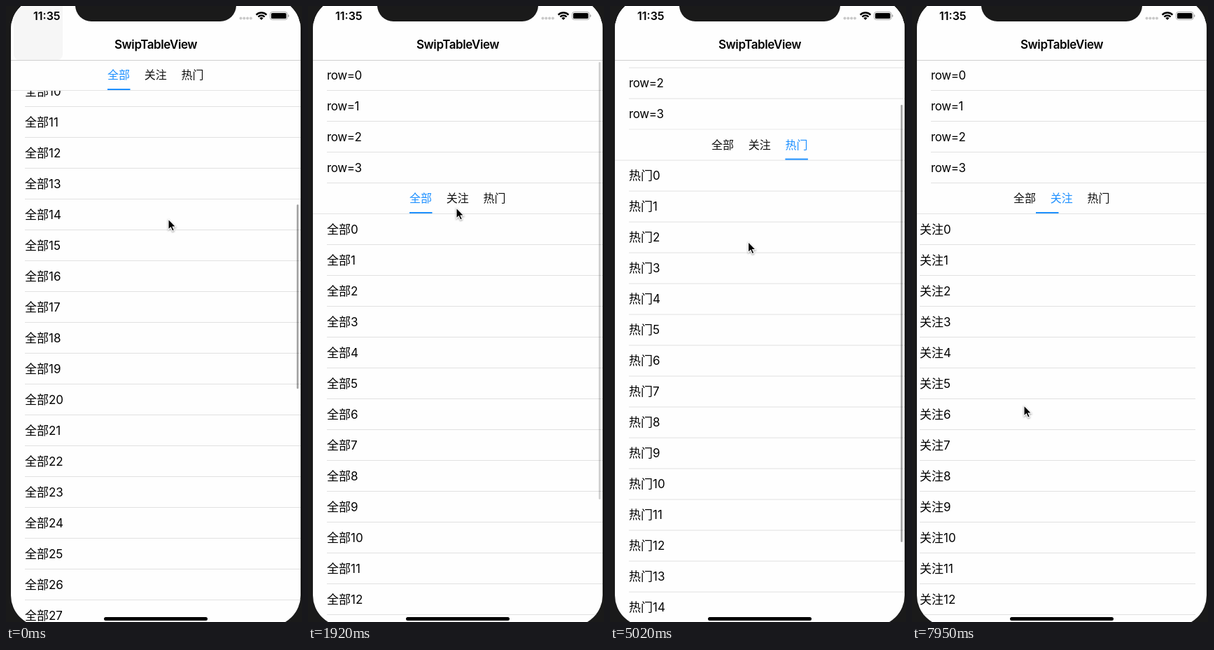
Recreate the animation shown at these times as an HTML page. Size 423x879 px, loop 8 s.

```html
<!DOCTYPE html>
<html lang="zh">
<head>
<meta charset="utf-8">
<title>SwipTableView</title>
<style>
  html, body { margin: 0; width: 100%; height: 100%; overflow: hidden; background: #1a1a1a; }
  svg { display: block; width: 423px; height: 879px; }
  text { font-family: Inter, "Noto Sans CJK SC", "Noto Sans CJK", sans-serif; fill: #000; }
  .row { font-size: 17px; }
  #head .row { letter-spacing: -.43px; }
  .tab { font-size: 16px; font-weight: 500; }
  .bold { font-weight: 600; }
</style>
</head>
<body>
<svg id="stage" viewBox="0 0 423 879">
  <defs>
    <clipPath id="screen"><rect x="7" y="-11" width="414" height="896" rx="44"/></clipPath>
  </defs>
  <rect width="423" height="879" fill="#1a1a1a"/>
  <g clip-path="url(#screen)">
    <rect x="7" y="-11" width="414" height="896" fill="#fefefe"/>
    <g id="lists"></g>
    <g id="head"></g>
    <g id="tabs">
      <rect x="7" width="414" height="44" fill="#fefefe"/>
      <rect x="7" y="43" width="414" height="1" fill="#e4e4e4"/>
      <rect id="line" y="41" width="32.5" height="2" fill="#1e90ff"/>
    </g>
    <rect id="bar" x="415.5" width="2.5" rx="1.25"/>
    <rect x="7" y="-11" width="414" height="88" fill="#fefefe"/>
    <rect id="shade" x="11" y="-10" width="70" height="87" rx="8" fill="#f6f6f6"/>
    <rect x="7" y="77" width="414" height="1" fill="#cfcfcf"/>
    <text class="bold" x="39" y="20" font-size="16">11:35</text>
    <text class="bold" x="214" y="61" font-size="17" letter-spacing="-.43" text-anchor="middle">SwipTableView</text>
    <g id="dots" fill="#c9c9c9"></g>
    <g fill="none" stroke="#000" stroke-width="2.4">
      <path d="M357.6 12.6a10.4 10.4 0 0 1 14.8 0"/>
      <path d="M360.4 15.5a6.4 6.4 0 0 1 9.2 0"/>
    </g>
    <path d="M362.4 17.2a3.8 3.8 0 0 1 5.2 0L365 19.9z"/>
    <rect x="377.5" y="8.5" width="24.5" height="11" rx="3" fill="none" stroke="#a6a6a6"/>
    <rect x="379" y="10" width="21.5" height="8" rx="1.6"/>
    <path d="M403 12v4q1.6-.6 1.6-2t-1.6-2z" fill="#a6a6a6"/>
    <rect x="99" y="-40" width="230" height="62" rx="23" fill="#1a1a1a"/>
    <rect x="140" y="872" width="148" height="5" rx="2.5"/>
  </g>
  <path id="mouse" d="M0 0V15.2L3.4 12L5.8 17.2L8.4 16.1L6.1 11.1H10.8Z" stroke="#fff" stroke-width="1.1"
    style="filter:drop-shadow(0 1px 1px #0006)"/>
</svg>
<script>
const $ = id => document.getElementById(id);
const names = ['全部', '关注', '热门'];
const LOOP = 8000, STEP = 147.2, ROW = 44, WIDTH = 414, NAV = 77, HEAD = 4 * ROW;
const tabX = i => 145 + 52.7 * i;

function add(parent, tag, attrs, text) {
  const el = document.createElementNS('http://www.w3.org/2000/svg', tag);
  for (const k in attrs) el.setAttribute(k, attrs[k]);
  if (text) el.textContent = text;
  return parent.appendChild(el);
}

function addRows(parent, count, label) {
  for (let i = 0; i < count; i++) {
    add(parent, 'text', { class: 'row', x: 27, y: ROW * i + 27.5 }, label + i);
    add(parent, 'rect', { x: 27, y: ROW * i + 43, width: 394, height: 1, fill: '#e1e1e1' });
  }
}

const pages = names.map(name => {
  const g = add($('lists'), 'g', {});
  addRows(g, 50, name);
  return g;
});
add($('head'), 'rect', { x: 7, width: WIDTH, height: HEAD, fill: '#fefefe' });
addRows($('head'), 4, 'row=');
const tabs = names.map((name, i) => add($('tabs'), 'text', { class: 'tab', x: tabX(i), y: 27 }, name));
for (let i = 0; i < 4; i++) add($('dots'), 'circle', { cx: 335.5 + 4.8 * i, cy: 17.5, r: 2 });

const ramp = (n, a, b) => Math.min(1, Math.max(0, (n - a) / (b - a)));
const smooth = u => u * u * (3 - 2 * u);

// Each move is [first step, last step, destination]
const glide = (n, from, moves) =>
  moves.reduce((v, [a, b, to]) => v + (to - v) * smooth(ramp(n, a, b)), from);

const flings = [[0, 8.47, 0], [18, 26, 832], [26, 35.84, 0]];
const swipes = [[14, 17, 2], [41, 45, 1], [46, 50, 0], [51, 54, 1.0386]];
const drags = [
  [0, 5, [191, 497]], [8, 13, [212, 288]], [13, 15, [264, 276]], [17, 20, [238, 600]],
  [20, 24, [245, 239]], [25, 29, [210, 566]], [30, 33, [200, 320]], [33, 40, [155, 618]],
  [41, 44, [408, 560]], [44, 46, [170, 575]], [46, 48, [400, 560]], [51, 54, [160, 570]]
];
const axis = i => drags.map(([a, b, to]) => [a, b, to[i]]);
const dragX = axis(0), dragY = axis(1);

function scrollAt(n) {
  const v = Math.max(0, n - 35.84);
  return glide(n, 637, flings) - 42 * v * Math.exp(-v); // rubber band at the top
}
const pageAt = n => glide(n, 0, swipes);
const barAlpha = n => .37 * (1 - ramp(n, 11, 15) + ramp(n, 19, 20) - ramp(n, 41, 44));

const move = (el, x, y) => el.setAttribute('transform', `translate(${x} ${y})`);

function draw(ms) {
  const n = Math.floor(ms / STEP);
  const s = scrollAt(n), p = pageAt(n);
  const pinned = s >= HEAD;

  pages.forEach((g, i) => move(g, (i - p) * WIDTH, NAV + HEAD + ROW - s));
  move($('head'), 0, NAV - s);
  move($('tabs'), 0, NAV + Math.max(0, HEAD - s));
  tabs.forEach((t, i) => t.style.fill = i === Math.round(p) ? '#1e90ff' : '#111');
  $('line').setAttribute('x', tabX(pageAt(n - 1.33)));

  $('bar').setAttribute('y', pinned ? 64 + s * .344 : 80 + Math.max(0, s) * .8);
  $('bar').setAttribute('height', pinned ? 263 : 624 + Math.min(0, s));
  $('bar').setAttribute('opacity', barAlpha(n));
  $('shade').setAttribute('opacity', pinned ? 1 : 0);
  move($('mouse'), glide(n, 232, dragX), glide(n, 304, dragY));
}

const start = performance.now();
function tick(now) {
  draw(Math.max(0, now - start) % LOOP);
  requestAnimationFrame(tick);
}
draw(0);
requestAnimationFrame(tick);
</script>
</body>
</html>
```
